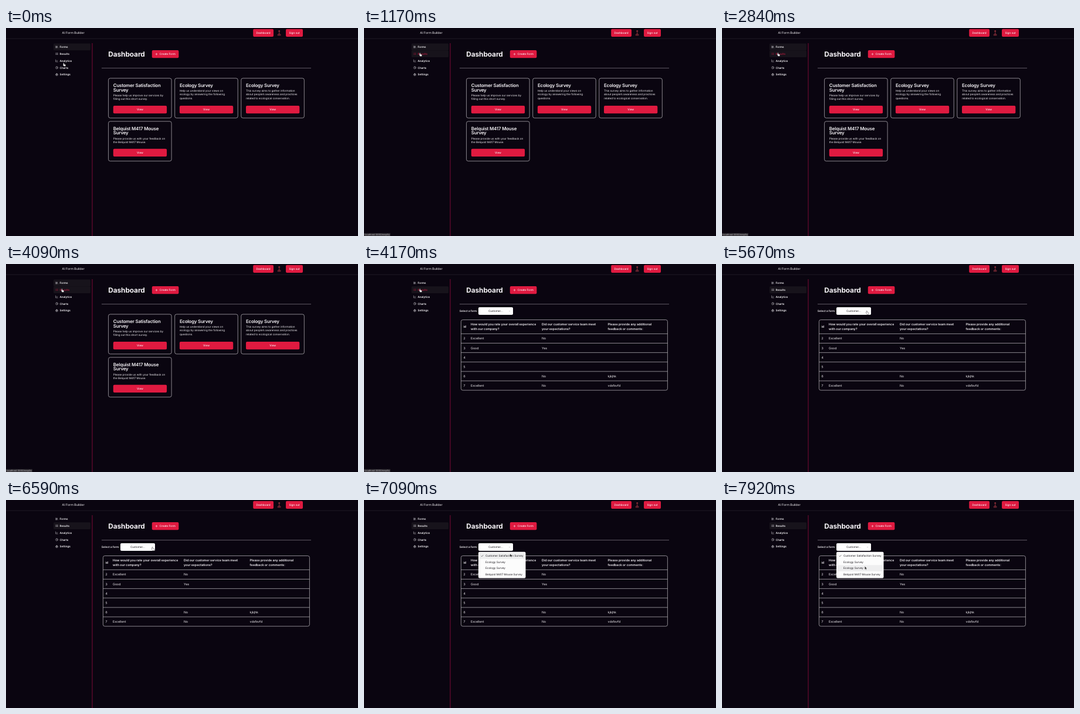
An HTML page that plays this animation: 600 px wide and 356 px high, repeating every 8000 ms.

```html
<!DOCTYPE html>
<html lang="en">
<head>
<meta charset="utf-8">
<title>AI Form Builder</title>
<style>
  html, body { margin: 0; width: 100%; height: 100%; overflow: hidden; background: #0a0510; }
  svg { display: block; width: 100vw; height: 100vh; }
  text { font-family: Inter, sans-serif; font-size: 4.62px; fill: #f6f4f7; text-rendering: geometricPrecision; white-space: pre; }
  .medium { font-weight: 500; }
  .semi { font-weight: 600; }
  .mid { text-anchor: middle; }
  .heading { font-size: 11.88px; font-weight: 700; letter-spacing: -.1px; }
  .title { font-size: 7.92px; font-weight: 600; letter-spacing: -.025em; }
  .body { font-size: 5.28px; }
  .dark { fill: #18151a; }
  .status { font-size: 4px; fill: #b9b6bb; }
  .frame { fill: none; stroke: #cfccd1; stroke-width: .65; }
  .icon { fill: none; stroke: #f6f4f7; stroke-width: 2; stroke-linecap: round; stroke-linejoin: round; }
  .hover text { fill: #a81a3c; }
  .hover .icon { stroke: #a81a3c; }
</style>
</head>
<body>
<svg id="stage" viewBox="0 0 600 356" preserveAspectRatio="none"></svg>
<script>
const LOOP = 8000;
const RED = '#df1a40';
const ROW = 11.85;

const text = (x, y, content, cls = '') => `<text x="${x}" y="${y}" class="${cls}">${content}</text>`;
const box = (x, y, w, h, fill, r = 0, extra = '') =>
  `<rect x="${x}" y="${y}" width="${w}" height="${h}" rx="${r}" fill="${fill}" ${extra}/>`;
const line = (x1, y1, x2, y2, color, width = .65) =>
  `<path d="M${x1} ${y1}L${x2} ${y2}" stroke="${color}" stroke-width="${width}"/>`;
const lines = (x, y, step, rows, cls) => rows.map((row, i) => text(x, y + i * step, row, cls)).join('');
const button = (x, y, w, label) =>
  box(x, y, w, 13.2, RED, 2) + text(x + w / 2, y + 8.25, label, 'medium mid');

const navItems = [
  ['Forms', 'm16 6 4 14M12 6v14M8 8v12M4 4v16'],
  ['Results', 'M8 6h13M8 12h13M8 18h13M3 6h.01M3 12h.01M3 18h.01'],
  ['Analytics', 'M3 3v18h18M19 9l-5 5-4-4-3 3'],
  ['Charts', 'M21.2 15.9A10 10 0 1 1 8 2.8M22 12A10 10 0 0 0 12 2v10z'],
  ['Settings', 'M12 9a3 3 0 1 0 .01 0M12 4a8 8 0 1 0 .01 0M12 2v2M12 20v2M2 12h2M20 12h2M5 5l1 1M18 18l1 1M5 19l1-1M18 6l1-1']
];

function navItem([label, path], i) {
  const y = 26.4 + i * ROW;
  return `<g id="nav${i}">${box(81, y, 63, ROW, '#17131b', 1.5, `id="fill${i}"`)}
    <path class="icon" d="${path}" transform="translate(84 ${y + 3.4}) scale(.21)"/>
    ${text(91.5, y + 7.65, label, 'semi')}</g>`;
}

function card(x, y, title, description) {
  const descriptionY = y + 14.9 + title.length * 7.92;
  return `<rect class="frame" x="${x}" y="${y}" width="107.5" height="68" rx="3"/>`
    + lines(x + 8.2, y + 14.7, 7.92, title, 'title')
    + lines(x + 8.2, descriptionY, 6.6, description, '')
    + button(x + 8.2, y + 47, 91.3, 'View');
}

const header = text(95.5, 10.2, 'AI Form Builder', 'body')
  + line(0, 18.2, 600, 18.2, '#2b2631')
  + button(421.2, 1.8, 34.8, 'Dashboard')
  + button(477, 1.8, 29, 'Sign out')
  + '<circle cx="465.7" cy="5.3" r="1.4" fill="#92303a"/>'
  + '<path d="M465.2 6.5h1l.5 3 2.3 2.2-1.2 1.6h-4.4l-1.2-1.6 2.5-2.2z" fill="#63222d"/>';

const shared = line(147, 26, 147, 356, '#7d0b36', 1)
  + text(174.3, 49, 'Dashboard', 'heading')
  + box(248.8, 38, 45.6, 13.3, RED, 2)
  + line(254.6, 44.7, 258.4, 44.7, '#fff', .5) + line(256.5, 42.8, 256.5, 46.6, '#fff', .5)
  + text(261.6, 46.3, 'Create Form', 'medium')
  + line(163, 68.7, 520, 68.7, '#918d95');

const formsPage =
  card(174.6, 86, ['Customer Satisfaction', 'Survey'],
    ['Please help us improve our services by', 'filling out this short survey.'])
  + card(287.7, 86, ['Ecology Survey'],
    ['Help us understand your views on', 'ecology by answering the following', 'questions.'])
  + card(400.8, 86, ['Ecology Survey'],
    ['This survey aims to gather information', 'about people’s awareness and practices', 'related to ecological conservation.'])
  + card(174.6, 159.8, ['Belquist M417 Mouse', 'Survey'],
    ['Please provide us with your feedback on', 'the Belquist M417 Mouse.']);

const columns = [169.4, 182, 303, 415.6];
const answers = [
  ['2', 'Excellent', 'No', ''], ['3', 'Good', 'Yes', ''], ['4', '', '', ''],
  ['5', '', '', ''], ['6', '', 'No', 'kjkjhk'], ['7', 'Excellent', 'No', 'vdsfsvfd']
];
const resultsPage = text(162.8, 82.3, 'Select a form', 'semi')
  + box(195, 74.1, 59, 13, '#fff', 2)
  + text(224.4, 82.3, 'Customer...', 'dark mid')
  + '<path id="chevron" d="M247 80.1l1.1 1.1 1.1-1.1" fill="none" stroke="#8d8a90" stroke-width=".45"/>'
  + '<rect class="frame" x="165.4" y="95.5" width="352" height="120.6" rx="3"/>'
  + text(columns[0], 109.2, 'id', 'body semi')
  + lines(columns[1], 105.2, 7.95, ['How would you rate your overall experience', 'with our company?'], 'body semi')
  + lines(columns[2], 105.2, 7.95, ['Did our customer service team meet', 'your expectations?'], 'body semi')
  + lines(columns[3], 105.2, 7.95, ['Please provide any additional', 'feedback or comments:'], 'body semi')
  + answers.map((row, r) => {
      const y = 119.4 + r * 16.12;
      return line(165.4, y, 517.4, y, '#cfccd1')
        + row.map((cell, c) => text(columns[c], y + 10, cell, 'body')).join('');
    }).join('');

const options = ['Customer Satisfaction Survey', 'Ecology Survey', 'Ecology Survey', 'Belquist M417 Mouse Survey'];
const menu = box(195, 88.8, 80.5, 45, '#fcfcfc', 2)
  + box(196.3, 0, 78, 10.5, '#eeeeef', 1, 'id="optionFill"')
  + '<path d="M199.6 95.6l1.2 1.2 2.4-2.6" fill="none" stroke="#18151a" stroke-width=".55"/>'
  + options.map((option, i) => text(207, 97.2 + i * 10.55, option, 'dark')).join('');

const stage = document.getElementById('stage');
stage.innerHTML = box(0, 0, 600, 356, '#0a0510') + header + navItems.map(navItem).join('') + shared
  + `<g id="forms">${formsPage}</g><g id="results">${resultsPage}</g><g id="menu">${menu}</g>
  <g id="status">${box(0, 351, 46, 5, '#302d33', 1, 'id="statusFill"')}${text(1.2, 355, '', 'status')}</g>
  <path id="hand" transform-origin="0 0" fill="#fff" stroke="#17131b" stroke-width=".4"
    d="M0 0c.5 0 .7.4.7.8v1.7l1.9.4c.6.1.9.5.8 1.1l-.4 2H.3l-1.7-2.4c-.3-.6.3-.9.7-.5V.8C-.7.3-.4 0 0 0z"/>
  <path id="arrow" fill="#0b0b0b" stroke="#fff" stroke-width=".4" d="M0 0v5.4l1.3-1.2.8 1.9.8-.4-.8-1.8h1.8z"/>`;

const find = id => document.getElementById(id);
const show = (id, visible) => find(id).setAttribute('visibility', visible ? 'visible' : 'hidden');

// Pointer stops: time, x, y
const stops = [
  [0, 98.4, 59.6], [340, 98.4, 59.6], [800, 95.4, 42.6], [1000, 95.4, 42.6], [1400, 95.4, 42.2],
  [4670, 95.4, 42.2], [4800, 108, 55], [5000, 204.6, 75.8], [5170, 204.6, 75.8], [5750, 249, 80.4],
  [6340, 249, 80.4], [6590, 249.5, 80.4], [6800, 249.5, 80.4], [7090, 249, 92],
  [7170, 249, 92], [7800, 243.3, 113.6], [LOOP, 243.3, 113.6]
];

function pointerAt(time) {
  const next = Math.max(1, stops.findIndex(stop => stop[0] > time));
  const [t0, x0, y0] = stops[next - 1], [t1, x1, y1] = stops[next];
  const p = (time - t0) / (t1 - t0), ease = p * p * (3 - 2 * p);
  return [x0 + (x1 - x0) * ease, y0 + (y1 - y0) * ease];
}

function draw(time) {
  const [x, y] = pointerAt(time);
  const onResults = time >= 4170;
  const menuOpen = time >= 6760;
  const hovered = time >= 590 && time < 4720 ? 1 : time >= 4720 && time < 4880 ? 2 : -1;

  show('forms', !onResults);
  show('results', onResults);
  show('menu', menuOpen);
  show('chevron', onResults && !(time >= 5600 && time < 6760));
  navItems.forEach((_, i) => {
    show('fill' + i, i === hovered || i === (onResults ? 1 : 0));
    find('nav' + i).setAttribute('class', i === hovered ? 'hover' : '');
  });

  const target = time < 4760 ? 'results' : 'analytics';
  show('status', time >= 670 && time < 5330);
  find('statusFill').setAttribute('width', target === 'results' ? 45 : 49);
  stage.querySelector('.status').textContent = 'localhost:3000/' + target;

  const option = Math.min(3, Math.max(0, Math.floor((y - 90.2) / 10.55)));
  find('optionFill').setAttribute('y', 90.2 + option * 10.55 + .2);

  const isHand = time < 4880 || (time >= 5500 && time < 6760);
  show('hand', isHand);
  show('arrow', !isHand);
  find(isHand ? 'hand' : 'arrow').setAttribute('transform', `translate(${x} ${y})`);
}

const start = performance.now();
function tick() {
  draw((performance.now() - start) % LOOP);
  requestAnimationFrame(tick);
}
tick();
</script>
</body>
</html>
```
